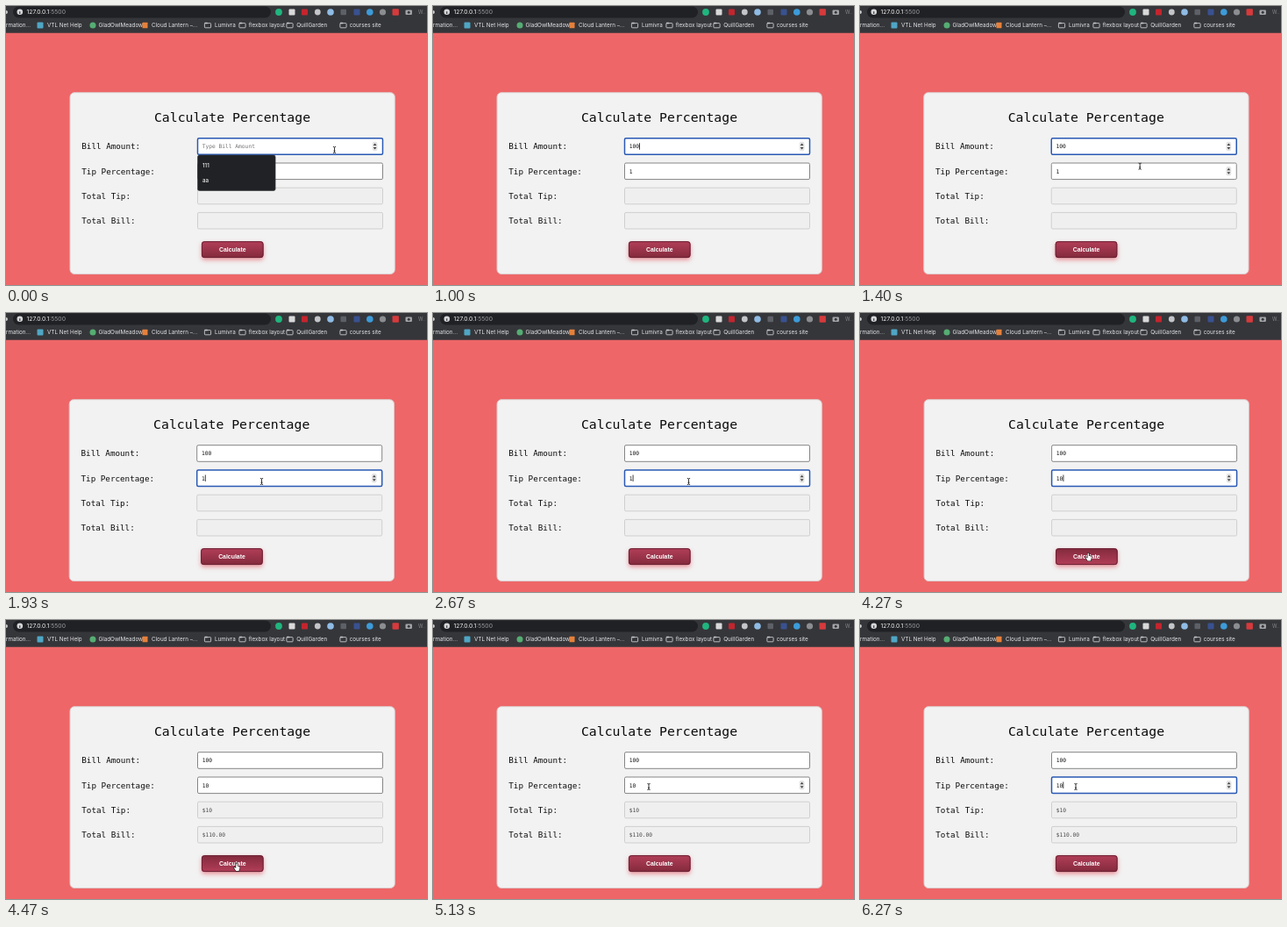
Recreate the animation shown at these times as an HTML page with a canvas. Size 480 px wide and 318 px high, loop 6.59 s.

```html
<!DOCTYPE html>
<html lang="en">
<head>
<meta charset="utf-8">
<title>Calculate Percentage</title>
<style>
html, body { margin: 0; width: 100%; height: 100%; overflow: hidden; background: #ee6668; }
canvas { display: block; width: 480px; height: 318px; }
</style>
</head>
<body>
<canvas id="stage"></canvas>
<script>
const W = 480, H = 318, LOOP = 6590;
const MONO = '"DejaVu Sans Mono", monospace';
const UI = 'Inter, sans-serif';
const ARIAL = '"Liberation Sans", sans-serif';
const canvas = document.getElementById('stage');
const ctx = canvas.getContext('2d');
const ratio = window.devicePixelRatio || 1;
canvas.width = W * ratio;
canvas.height = H * ratio;

const ROWS = [160, 188.3, 216.5, 244.7];
const LABELS = ['Bill Amount:', 'Tip Percentage:', 'Total Tip:', 'Total Bill:'];
const FIELD = { x: 218.5, w: 211, h: 18.6 };
const BUTTON = { x: 223, y: 268.3, w: 70.5, h: 18.7 };

// [time, horizontal card offset]
const SHAKE = [
  [1000, 0], [1130, .5], [1330, -.7], [1530, .6], [1670, 0],
  [1800, 0], [1930, -.8], [2070, .9], [2200, 0],
  [3270, 0], [3400, -.4], [3530, 1], [3670, -1.5], [3800, -1],
  [3930, 1], [4070, -1], [4200, .8], [4330, -.5], [4470, 0]
];
// [time, x, y]
const POINTER = [
  [0, 374.5, 164], [1000, 374.5, 164], [1600, 291.5, 192],
  [3270, 291.5, 192], [3800, 239.5, 247], [4330, 263, 279],
  [4670, 263, 279], [5130, 246, 190]
];
const CARET_RESETS = [-500, 70, 270, 530, 1670, 2930, 5270];

// Linear interpolation through rows of [time, value...]
function sample(keys, t, col) {
  const i = keys.findIndex(k => k[0] > t);
  if (i < 0) return keys[keys.length - 1][col];
  if (i === 0) return keys[0][col];
  const a = keys[i - 1], b = keys[i];
  return a[col] + (b[col] - a[col]) * (t - a[0]) / (b[0] - a[0]);
}

function box(x, y, w, h, r, fill, stroke, line = 1) {
  ctx.beginPath();
  ctx.roundRect(x, y, w, h, r);
  if (fill) { ctx.fillStyle = fill; ctx.fill(); }
  if (stroke) { ctx.strokeStyle = stroke; ctx.lineWidth = line; ctx.stroke(); }
}

function disc(x, y, r, fill) {
  ctx.beginPath();
  ctx.arc(x, y, r, 0, Math.PI * 2);
  ctx.fillStyle = fill;
  ctx.fill();
}

function shape(points, fill, stroke, line = 1) {
  ctx.beginPath();
  points.forEach(([x, y]) => ctx.lineTo(x, y));
  ctx.closePath();
  if (stroke) { ctx.strokeStyle = stroke; ctx.lineWidth = line; ctx.stroke(); }
  ctx.fillStyle = fill;
  ctx.fill();
}

function text(str, x, y, font, fill, align = 'left') {
  ctx.font = font;
  ctx.fillStyle = fill;
  ctx.textAlign = align;
  ctx.fillText(str, x, y);
}

function folder(x) {
  box(x - 3.6, 19.6, 7.2, 5.2, .8, null, '#c9cacc', .9);
  box(x - 3.6, 18.7, 3.4, 1.6, .4, '#c9cacc');
}

function drawBrowser() {
  box(0, 0, W, 30.7, 0, '#35363a');
  box(8, .5, 294, 13, 6.5, '#202124');
  disc(0, 7, 2, '#c9cacc');
  disc(15.8, 6.8, 3.3, '#d5d6d8');
  box(15.3, 6.2, 1, 2.7, 0, '#202124');
  text('127.0.0.1', 23.5, 9.4, `6.8px ${UI}`, '#f1f1f2');
  const w = ctx.measureText('127.0.0.1').width;
  text(':5500', 23.5 + w, 9.4, `6.8px ${UI}`, '#9a9b9f');

  disc(311, 7, 3.9, '#20b57e');
  box(322.5, 3.5, 7, 7, 1, '#d9d9da');
  box(337, 3.5, 7, 7, 1, '#c4252e');
  disc(355.3, 7, 3.4, '#c3c5c8');
  disc(370, 7, 3.8, '#8fbbe4');
  box(381.5, 3.7, 6.5, 6.5, 1, '#5d6167');
  box(396.5, 3.5, 7, 7, 1, '#39518f');
  disc(414.8, 7, 3.8, '#3c9bd9');
  disc(429.5, 7, 3.6, '#8b8d91');
  box(440.5, 3.3, 7.4, 7.4, 1, '#d63a3c');
  box(455.5, 4.5, 7.4, 5.5, 1, '#a5a6a9');
  disc(459.2, 7.3, 1.5, '#35363a');
  text('W..', 470, 9, `5.5px ${UI}`, '#85868a');

  const label = (str, x) => text(str, x, 24.2, `6.3px ${UI}`, '#e4e5e7');
  label('formation...', -6);
  box(35.5, 18.5, 7, 7, 1, '#4fa6c4');
  label('VTL Net Help', 47);
  disc(99, 22, 3.5, '#55ad72');
  label('GladOwlMeadow', 105.5);
  box(155.5, 18.7, 6, 6.5, .5, '#e6803a');
  label('Cloud Lantern –...', 166);
  [230, 269.5, 323.5, 384.5].forEach(folder);
  label('Lumivra', 238);
  label('flexbox layout', 276.7);
  label('QuillGarden', 331.3);
  label('courses site', 391.7);
}

function drawSpinner(y) {
  box(417.7, y - 5.3, 5.8, 10.6, 2.3, '#e4e4e4');
  shape([[418.7, y - 1], [422.5, y - 1], [420.6, y - 3.5]], '#444');
  shape([[418.7, y + 1], [422.5, y + 1], [420.6, y + 3.5]], '#444');
}

function drawField(i, s) {
  const y = ROWS[i], top = y - FIELD.h / 2;
  const focused = s.active === i, locked = i > 1;
  box(FIELD.x, top, FIELD.w, FIELD.h, 1.5, locked ? '#efefef' : '#fff',
    focused ? '#2959b4' : locked ? '#cfcfcf' : '#858585', focused ? 1.5 : 1);
  const value = s.values[i];
  const font = `6.25px ${MONO}`;
  if (value) text(value, 223.7, y + 2.3, font, locked ? '#4c4c4c' : '#111');
  else if (i === 0) text('Type Bill Amount', 223.7, y + 2.3, font, '#757575');
  if (focused && s.caret) {
    ctx.font = font;
    box(223.9 + ctx.measureText(value).width, y - 3.7, .8, 7.4, 0, '#111');
  }
  if (!locked && (focused || s.hover === i)) drawSpinner(y);
}

function drawButton(pressed) {
  const { x, y, w, h } = BUTTON;
  const fill = ctx.createLinearGradient(0, y, 0, y + h);
  fill.addColorStop(pressed ? 1 : 0, '#b23e58');
  fill.addColorStop(pressed ? 0 : 1, '#832a3d');
  ctx.save();
  ctx.shadowColor = 'rgba(226, 70, 84, .55)';
  ctx.shadowBlur = 5 * ratio;
  ctx.shadowOffsetY = 2.5 * ratio;
  box(x, y, w, h, 3, '#8f2c42');
  ctx.restore();
  box(x + .4, y + .4, w - .8, h - .8, 3, fill, '#662033', .9);
  text('Calculate', x + w / 2, y + 11.8, `bold 6.9px ${ARIAL}`, '#fff', 'center');
}

function drawSuggestions(items) {
  if (!items.length) return;
  box(218.5, 170, 88.6, 6.5 + 17 * items.length, 2, '#202225', '#34363a', .6);
  items.forEach((item, i) => text(item, 224, 184.4 + 17 * i, `500 6.2px ${UI}`, '#f2f2f2'));
}

function drawCard(s) {
  ctx.save();
  ctx.translate(s.shift, 0);
  box(73, 98.7, 370.3, 206.8, 5, '#f2f2f2', '#dcc9ca', 1);
  text('Calculate Percentage', 258, 132.3, `14.8px ${MONO}`, '#0c0c0c', 'center');
  LABELS.forEach((label, i) => {
    text(label, 86.3, ROWS[i] + 3.4, `9.25px ${MONO}`, '#0c0c0c');
    drawField(i, s);
  });
  drawButton(s.hover === 'button');
  drawSuggestions(s.suggestions);
  ctx.restore();
}

function drawPointer(x, y, hover) {
  ctx.save();
  ctx.translate(x, y);
  if (hover === 0 || hover === 1) {
    ctx.beginPath();
    ctx.moveTo(-1.6, -3.6);
    ctx.quadraticCurveTo(0, -3.6, 0, -2.4);
    ctx.lineTo(0, 2.4);
    ctx.quadraticCurveTo(0, 3.6, -1.6, 3.6);
    ctx.moveTo(1.6, -3.6);
    ctx.quadraticCurveTo(0, -3.6, 0, -2.4);
    ctx.moveTo(0, 2.4);
    ctx.quadraticCurveTo(0, 3.6, 1.6, 3.6);
    ctx.moveTo(-1, 1.2);
    ctx.lineTo(1, 1.2);
    ctx.strokeStyle = '#222';
    ctx.lineWidth = .9;
    ctx.stroke();
  } else if (hover === 'button') {
    shape([[-.8, -1.6], [.5, -1.6], [.6, 1.3], [3.4, 2.2], [3.4, 4.6], [2.4, 7], [-.8, 7], [-3, 3.4], [-2.2, 2.8], [-.8, 4]],
      '#fff', '#111', 1.2);
  } else {
    shape([[0, 0], [0, 6.6], [1.5, 5.3], [2.5, 7.7], [3.5, 7.2], [2.5, 5], [4.5, 4.9]],
      '#111', '#fff', 1.2);
  }
  ctx.restore();
}

function inside(x, y, r) {
  return x >= r.x && x <= r.x + r.w && y >= r.y && y <= r.y + r.h;
}

function hoverAt(x, y) {
  if (inside(x, y, BUTTON)) return 'button';
  return ROWS.findIndex(row => inside(x, y, { ...FIELD, y: row - FIELD.h / 2 }));
}

function stateAt(t) {
  const x = sample(POINTER, t, 1), y = sample(POINTER, t, 2);
  const visible = t < 70 || (t > 1000 && t < 2930) || t >= 3330;
  const reset = CARET_RESETS.filter(r => r <= t).pop();
  const bill = '100'.slice(0, [70, 270, 530].filter(k => t >= k).length);
  const done = t >= 4470;
  return {
    x, y, visible,
    hover: visible ? hoverAt(x, y) : -1,
    shift: sample(SHAKE, t, 1),
    active: t < 1670 ? 0 : t < 4400 || t >= 5270 ? 1 : -1,
    caret: (t - reset) % 1000 < 500,
    values: [bill, t < 2930 ? '1' : '10', done ? '$10' : '', done ? '$110.00' : ''],
    suggestions: t < 70 ? ['111', 'aa'] : t < 270 ? ['111'] : []
  };
}

function draw(now) {
  const tick = Math.floor((now % LOOP) * .015 + .06);
  const s = stateAt(Math.round(tick * 20 / 3) * 10);
  ctx.setTransform(ratio, 0, 0, ratio, 0, 0);
  box(0, 0, W, H, 0, '#ee6668');
  drawBrowser();
  drawCard(s);
  if (s.visible) drawPointer(s.x, s.y, s.hover);
}

const start = performance.now();
function loop() {
  draw(performance.now() - start);
  requestAnimationFrame(loop);
}
loop();
</script>
</body>
</html>
```
